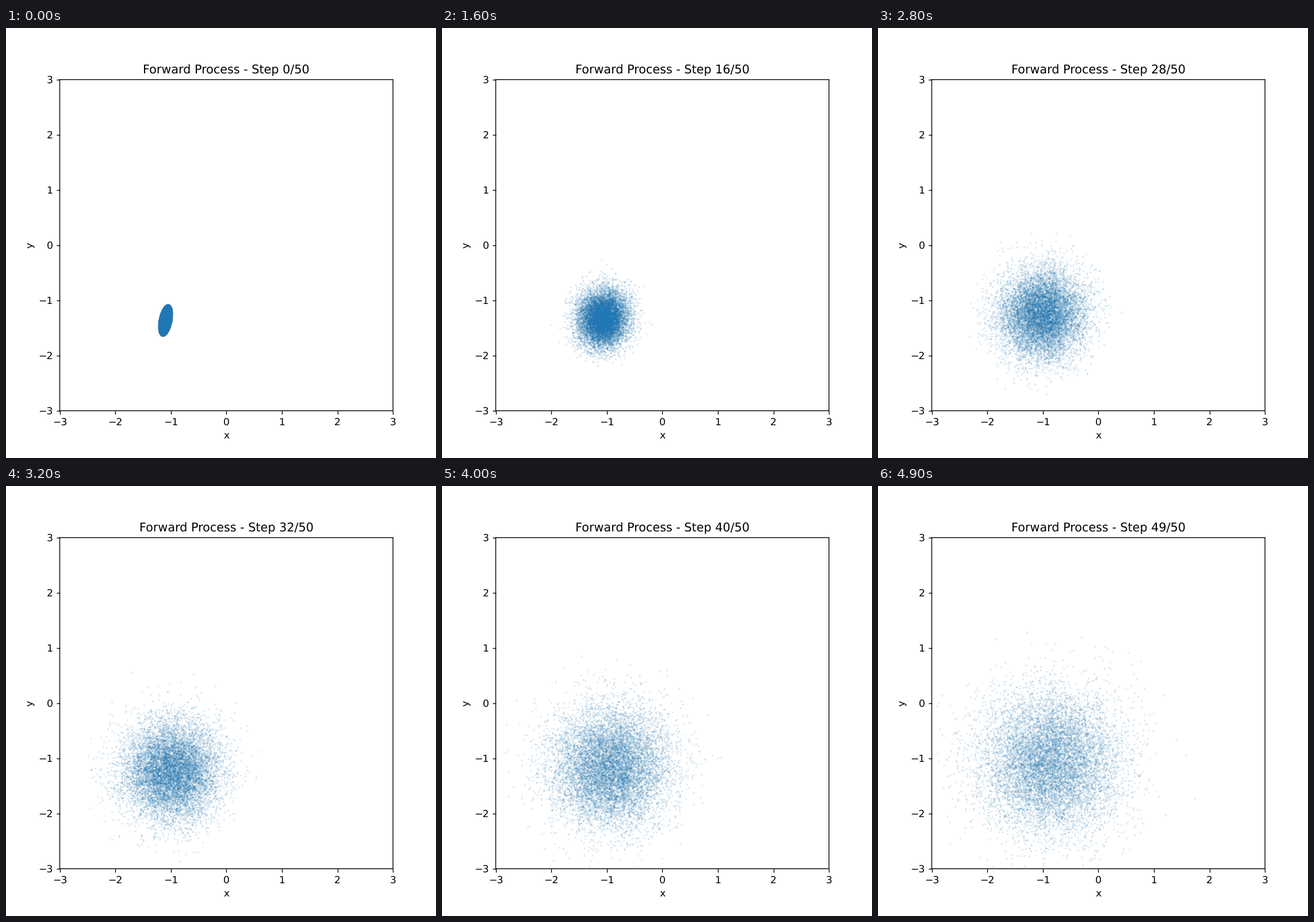
A matplotlib script for the animation above (5 s loop, 748x748 px).

```python
import numpy as np
import matplotlib.pyplot as plt
from matplotlib.animation import FuncAnimation

STEPS = 50
POINTS = 10000
INTERVAL = 100  # ms per step

# Keep sub-pixel positions for lines, dots and glyph outlines.
plt.rcParams.update({"path.snap": False, "text.hinting": "no_hinting"})

rng = np.random.default_rng(7)


def start_cloud():
    """Points spread evenly over a small, slightly tilted ellipse."""
    radius = np.sqrt(rng.random(POINTS))
    angle = rng.uniform(0, 2 * np.pi, POINTS)
    u, v = radius * np.cos(angle), radius * np.sin(angle)
    return np.column_stack([-1.10 + 0.047 * u + 0.111 * v, -1.36 + 0.283 * u])


def diffuse(cloud):
    """Every state of the noising walk with a linear variance schedule."""
    states = [cloud]
    for beta in np.linspace(1e-4, 0.02, STEPS)[:STEPS - 1]:
        noise = rng.standard_normal(cloud.shape)
        cloud = np.sqrt(1 - beta) * cloud + np.sqrt(beta) * noise
        states.append(cloud)
    return states


states = diffuse(start_cloud())

fig, ax = plt.subplots(figsize=(6, 6), dpi=124.667)
dots = ax.scatter(*states[0].T, s=1, alpha=0.1, color="tab:blue")
ax.set(xlim=(-3, 3), ylim=(-3, 3), xlabel="x", ylabel="y",
       xticks=range(-3, 4), yticks=range(-3, 4))
title = ax.set_title("")


def draw(step):
    dots.set_offsets(states[step])
    title.set_text(f"Forward Process - Step {step}/{STEPS}")
    return dots, title


anim = FuncAnimation(fig, draw, frames=STEPS, interval=INTERVAL,
                     repeat=True, repeat_delay=0, blit=False)
plt.show()
```
